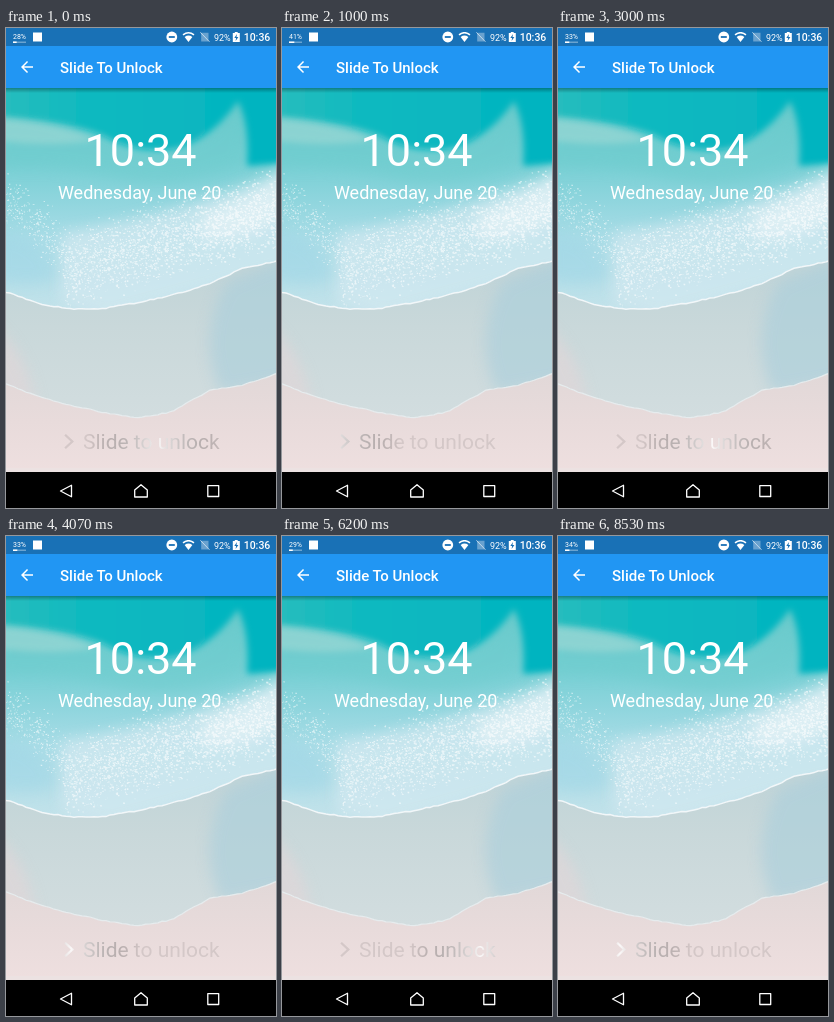
Animation of 270 by 480 pixels, one loop 8.59 s. Source, as an HTML page:

```html
<!DOCTYPE html>
<html lang="en">
<head>
<meta charset="utf-8">
<title>Slide To Unlock</title>
<style>
html, body { margin: 0; width: 100%; height: 100%; overflow: hidden; background: #000; }
svg { display: block; width: 100vw; height: 100vh; }
text { font-family: Roboto, sans-serif; fill: #fff; }
</style>
</head>
<body>
<svg viewBox="0 0 270 480" xmlns="http://www.w3.org/2000/svg">
  <defs>
    <linearGradient id="sea" x1="0" y1="80" x2="0" y2="282" gradientUnits="userSpaceOnUse">
      <stop offset="0" stop-color="#62c9ca"/>
      <stop offset=".25" stop-color="#74cfd3"/>
      <stop offset=".45" stop-color="#8ed5dd"/>
      <stop offset=".65" stop-color="#aadde7"/>
      <stop offset="1" stop-color="#c2e2ea"/>
    </linearGradient>
    <linearGradient id="deep" x1="0" y1="0" x2="1" y2="0">
      <stop offset="0" stop-color="#2cbdbd"/>
      <stop offset=".35" stop-color="#0cb9c0"/>
      <stop offset="1" stop-color="#02b3c0"/>
    </linearGradient>
    <linearGradient id="wet" x1="0" y1="250" x2="0" y2="390" gradientUnits="userSpaceOnUse">
      <stop offset="0" stop-color="#c2d5d8"/>
      <stop offset=".35" stop-color="#c9d8da"/>
      <stop offset="1" stop-color="#d2dddf"/>
    </linearGradient>
    <linearGradient id="sand" x1="0" y1="345" x2="0" y2="442" gradientUnits="userSpaceOnUse">
      <stop offset="0" stop-color="#e1d8d8"/>
      <stop offset=".5" stop-color="#e8dbdb"/>
      <stop offset="1" stop-color="#eedfdf"/>
    </linearGradient>
    <linearGradient id="drop" x1="0" y1="0" x2="0" y2="1">
      <stop offset="0" stop-opacity=".32"/>
      <stop offset="1" stop-opacity="0"/>
    </linearGradient>
    <!-- gradient is three label widths long, so the glow can leave on both sides -->
    <linearGradient id="shine" x1="-234" y1="0" x2="234" y2="0" gradientUnits="userSpaceOnUse">
      <stop offset=".35" stop-color="#000" stop-opacity=".12"/>
      <stop offset=".5" stop-color="#fff"/>
      <stop offset=".65" stop-color="#000" stop-opacity=".12"/>
    </linearGradient>
    <filter id="soft" x="-40%" y="-60%" width="180%" height="220%"><feGaussianBlur stdDeviation="7"/></filter>
    <filter id="mild" x="-10%" y="-30%" width="120%" height="160%"><feGaussianBlur stdDeviation="3"/></filter>
    <clipPath id="photo"><rect y="60" width="270" height="384"/></clipPath>
    <clipPath id="water"><path id="waterClip"/></clipPath>
    <clipPath id="damp"><path id="dampClip"/></clipPath>
  </defs>

  <g clip-path="url(#photo)">
    <rect y="60" width="270" height="384" fill="url(#sand)"/>
    <g clip-path="url(#damp)">
      <rect y="220" width="270" height="175" fill="url(#wet)"/>
      <path d="M290 225V352L215 365Q190 310 220 255Z" fill="#abcfdb" opacity=".65" filter="url(#soft)"/>
      <path d="M-20 290Q25 325 30 385H-20Z" fill="#e0d6d8" opacity=".7" filter="url(#soft)"/>
    </g>
    <path id="wetEdge" fill="none" stroke="#e6ecee" stroke-width="1.2"/>
    <g clip-path="url(#water)">
      <rect y="60" width="270" height="230" fill="url(#sea)"/>
      <path d="M-10 86Q60 92 95 108Q130 128 160 122Q205 112 230 72L242 100L236 136Q170 165 110 150Q50 134 -10 140Z"
        fill="#70ccce" opacity=".6" filter="url(#soft)"/>
      <path d="M-20 40H290V134L241 138Q244 96 232 73Q205 112 168 121Q128 126 98 108Q60 92 -20 88Z" fill="url(#deep)" filter="url(#mild)"/>
      <path d="M-10 90Q55 95 90 112Q45 120 -10 112Z" fill="#a5dad6" opacity=".55" filter="url(#mild)"/>
      <path d="M55 205Q160 190 285 140V240L100 290L55 275Z" fill="#d2e8f0" opacity=".75" filter="url(#soft)"/>
      <path d="M195 185Q245 170 285 140V185Q240 215 195 210Z" fill="#e6f3f7" opacity=".7" filter="url(#soft)"/>
      <path d="M-10 205Q35 205 50 245Q40 262 -10 252Z" fill="#9fd6e6" opacity=".55" filter="url(#soft)"/>
      <path id="spray" fill="#fff" opacity=".6"/>
    </g>
    <path id="foam" fill="none" stroke="#f2f7f9" stroke-width="1.5"/>
    <rect y="440" width="270" height="4" fill="#ece2e2"/>
    <rect y="60" width="270" height="5" fill="url(#drop)"/>
  </g>

  <rect width="270" height="18" fill="#1971b6"/>
  <rect y="18" width="270" height="42" fill="#2196f3"/>

  <text id="load" x="7" y="10.5" font-size="7"></text>
  <rect x="7" y="13.5" width="13" height="1.5" fill="#fff" opacity=".35"/>
  <rect id="bar" x="7" y="13.5" height="1.5" fill="#fff"/>
  <rect x="27" y="4.5" width="9" height="9" fill="#fff"/>
  <circle cx="165.8" cy="9" r="5.4" fill="#fff"/>
  <rect x="162.8" y="8.1" width="6" height="1.8" fill="#1971b6"/>
  <path d="M177 6.8Q182.5 2.6 188 6.8" fill="none" stroke="#fff" stroke-width="1.5"/>
  <path d="M178.6 9Q182.5 6.2 186.4 9L182.5 14Z" fill="#fff"/>
  <path d="M195 4.8H202.5V13.5H195.2V7.5Z" fill="#fff" opacity=".35"/>
  <path d="M194.3 4.3L203.5 13.8" stroke="#fff" stroke-width="1" opacity=".6"/>
  <text x="208" y="12.5" font-size="9">92%</text>
  <path d="M228.8 4H231.7V5H233.8V14H226.8V5H228.8Z" fill="#fff"/>
  <path d="M231 6L228.3 10H230.1L229.6 13L232.4 8.9H230.5Z" fill="#1971b6"/>
  <text x="237.7" y="13" font-size="10.5" font-weight="500">10:36</text>

  <path transform="translate(12 30) scale(.75)" fill="#fff" d="M20 11H7.83l5.59-5.59L12 4l-8 8 8 8 1.41-1.41L7.83 13H20z"/>
  <text x="54" y="45" font-size="15" font-weight="500">Slide To Unlock</text>

  <text x="134.6" y="137.5" font-size="45" text-anchor="middle">10:34</text>
  <text x="133.7" y="171" font-size="18" text-anchor="middle">Wednesday, June 20</text>

  <g opacity=".8">
    <path d="M58.3 407.6L59.9 406L68 413.5L59.9 421L58.3 419.4L64.7 413.5Z" fill="url(#shine)"/>
    <text x="77" y="421" font-size="21" style="fill:url(#shine)">Slide to unlock</text>
  </g>

  <rect y="444" width="270" height="36"/>
  <g fill="none" stroke="#fff" stroke-width="1.3" stroke-linejoin="round">
    <path d="M65.5 457.2V468.8L54.5 463Z"/>
    <path d="M128.7 469V462L135 456.7L141.3 462V469Z"/>
    <rect x="201.8" y="457.6" width="10.9" height="10.9"/>
  </g>
</svg>
<script>
const LOOP = 8590, STEP = 1000 / 15, SWEEP = 1494, LEAD = 828;
const LABEL = { x: 57, w: 156 };
// [time in ms, load in percent]
const LOADS = [[0, 28], [800, 41], [1800, 34], [3000, 33], [4400, 29], [6600, 30], [8000, 34]];

const el = id => document.getElementById(id);
const setPath = (id, d) => el(id).setAttribute('d', d);

// Seeded random numbers in 0..1
let seed = 20;
const rand = () => (seed = (seed * 16807) % 2147483647) / 2147483647;

function shore(points, rough) {
  let d = '';
  for (let x = -4; x <= 274; x += 4) {
    let i = 0;
    while (i < points.length - 2 && x > points[i + 1][0]) i++;
    const [x0, y0] = points[i], [x1, y1] = points[i + 1];
    const y = y0 + (y1 - y0) * (x - x0) / (x1 - x0) + (rand() - .5) * rough;
    d += (d ? 'L' : 'M') + x + ' ' + y.toFixed(1);
  }
  return d;
}

function drawBeach() {
  const wave = shore([[-4, 263], [18, 270], [38, 277], [65, 281], [98, 280.5], [135, 274],
    [175, 265], [205, 255], [235, 241], [274, 232]], 1.2);
  const wet = shore([[-4, 354], [25, 366], [55, 375], [95, 384], [132, 390], [165, 384],
    [188, 371], [205, 362], [238, 357], [274, 344]], 1);
  setPath('waterClip', wave + 'V60H-4Z');
  setPath('foam', wave);
  setPath('dampClip', wet + 'V220H-4Z');
  setPath('wetEdge', wet);

  let d = '';
  for (let i = 0; i < 3400; i++) {
    const x = rand() * 270, left = x < 58;
    if (left && rand() < .5) continue;
    const top = left ? 140 + x * .9 : 198 - (x - 58) * .27;
    const depth = left ? 60 : 84;
    const y = top + depth * (rand() + rand()) / 2 + (rand() - .5) * 12;
    const s = .4 + rand() * (.8 + x / 400);
    d += `M${x.toFixed(1)} ${y.toFixed(1)}h${(s * 1.3).toFixed(1)}v${s.toFixed(1)}h${(-s).toFixed(1)}z`;
  }
  setPath('spray', d);
}

function draw(ms) {
  const t = Math.floor(((ms % LOOP) + 4) / STEP) * STEP;
  const part = ((t + LEAD) % SWEEP) / SWEEP;
  const x = LABEL.x + LABEL.w * (2 * part - .5);
  el('shine').setAttribute('gradientTransform', `translate(${x.toFixed(2)} 0)`);

  const load = LOADS.filter(l => l[0] <= t + 1).pop()[1];
  el('load').textContent = load + '%';
  el('bar').setAttribute('width', 13 * load / 100);
}

drawBeach();
draw(0);
const start = performance.now();
function tick() {
  draw(performance.now() - start);
  requestAnimationFrame(tick);
}
requestAnimationFrame(tick);
</script>
</body>
</html>
```
